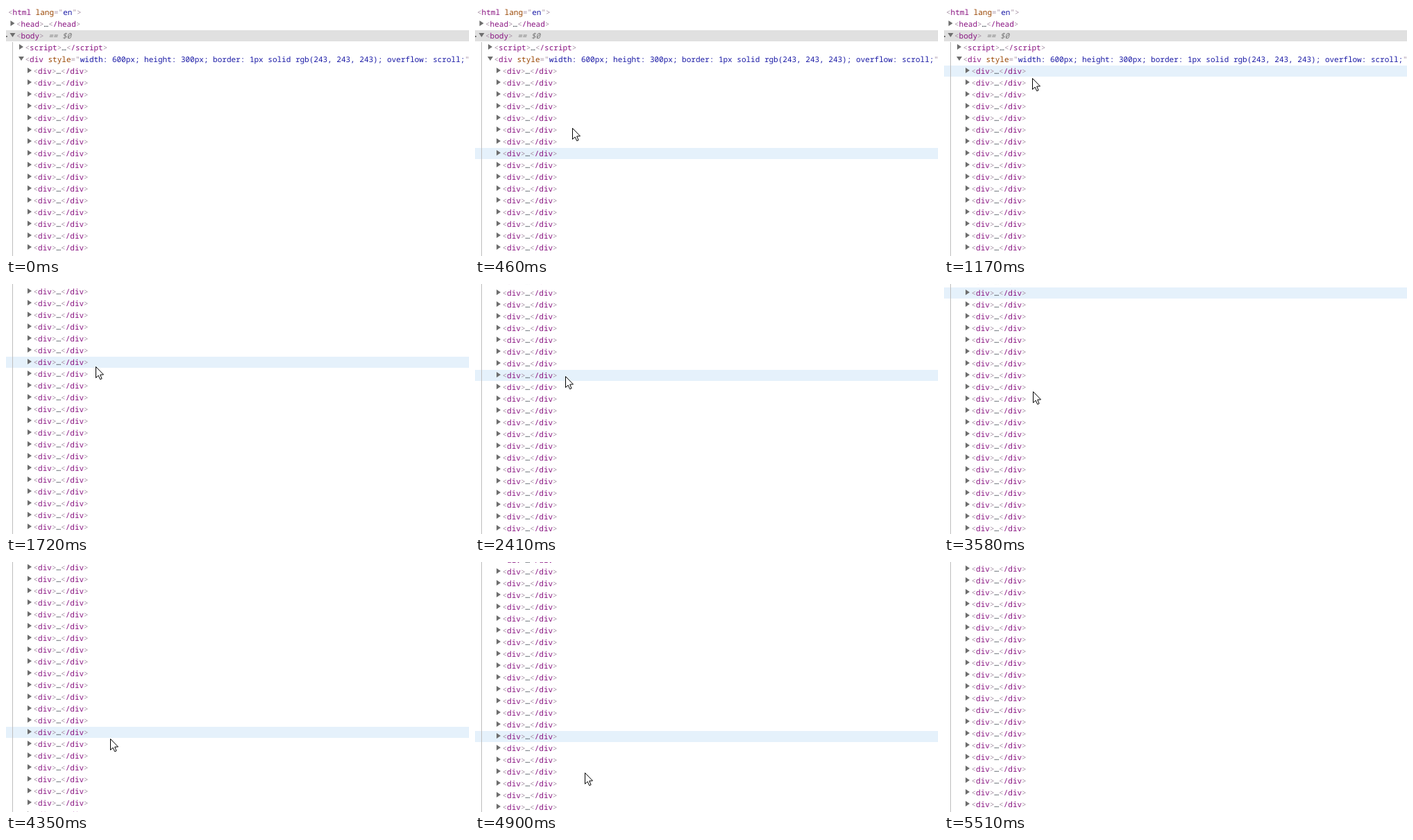
Recreate the animation shown at these times as an HTML page with a canvas. Size 667x361 px, loop 6.6 s.

```html
<!DOCTYPE html>
<html lang="en">
<head>
<meta charset="utf-8">
<title>Element tree scrolling</title>
<style>
  html, body { margin: 0; width: 100%; height: 100%; overflow: hidden; background: #fff; }
  canvas { display: block; }
</style>
</head>
<body>
<canvas id="stage" width="667" height="361"></canvas>
<script>
const WIDTH = 667, HEIGHT = 361, LOOP = 6600;
const TICK = 77.6;             // the screen refreshes in even steps
const FIRST_TICK = 1, LAST_TICK = 70;   // pointer is on stage between these
const ROW = 17, FIRST_CHILD = 94;
const PUNCT = '#a894a6', TAG = '#881280', ATTR = '#994500', VALUE = '#1a1aa6', DARK = '#303942';

const ctx = document.getElementById('stage').getContext('2d');

// Markup as [colour, text] runs
const attr = (name, value) => [[ATTR, ' ' + name], [PUNCT, '="'], [VALUE, value], [PUNCT, '"']];
const open = (name, attrs = []) => [[PUNCT, '<'], [TAG, name], ...attrs, [PUNCT, '>']];
const folded = name => [...open(name), [DARK, '…'], ...open('/' + name)];

const style = 'width: 600px; height: 300px; border: 1px solid rgb(243, 243, 243); overflow: scroll;';
const header = [
  { x: 3, runs: open('html', attr('lang', 'en')) },
  { x: 15, arrow: 'right', runs: folded('head') },
  { x: 15, arrow: 'down', runs: open('body'), selected: true },
  { x: 27.5, arrow: 'right', runs: folded('script') },
  { x: 27.5, arrow: 'down', runs: open('div', attr('style', style)) }
];
const child = { x: 39.5, arrow: 'right', runs: folded('div') };

// Wheel scrolling: start, end, from, to
const scrolls = [
  [1190, 1560, 0, 100],
  [1860, 2230, 100, 200],
  [2440, 2700, 200, 300],
  [2890, 3255, 300, 400],
  [3410, 3763, 400, 600],
  [3770, 4260, 600, 800],
  [4780, 5200, 800, 900]
];

// Pointer: time, x, y
const path = [
  [70, 165, 356], [390, 140, 175], [690, 128, 103.5], [770, 127, 102],
  [1090, 127, 102], [1164, 127, 104], [1780, 129, 121], [2405, 130, 133],
  [2710, 129, 138], [2790, 129, 138], [2870, 129, 139], [3260, 128, 155],
  [3570, 128, 155], [4345, 150, 255], [5432, 166, 352]
];

function scrollAt(t) {
  let top = 0;
  for (const [start, end, from, to] of scrolls) {
    if (t < start) break;
    const left = 1 - Math.min(1, (t - start) / (end - start));
    top = from + (to - from) * (1 - left * left);
  }
  return Math.round(top);
}

function pointerAt(t) {
  const next = path.findIndex(p => p[0] >= t);
  if (next <= 0) return path[next < 0 ? path.length - 1 : 0].slice(1);
  const a = path[next - 1], b = path[next];
  const u = (t - a[0]) / (b[0] - a[0]);
  return [a[1] + (b[1] - a[1]) * u, a[2] + (b[2] - a[2]) * u];
}

// Hover lags one refresh behind and sticks to its row while the list scrolls
function hoveredChild(t) {
  const seen = t - TICK;
  const active = scrolls.find(([start, end]) => seen >= start && seen < end);
  const when = active ? active[0] : seen;
  return Math.floor((pointerAt(when)[1] + scrollAt(when) - FIRST_CHILD + 8) / ROW);
}

function polygon(points, fill) {
  ctx.beginPath();
  points.forEach(([x, y]) => ctx.lineTo(x, y));
  ctx.closePath();
  ctx.fillStyle = fill;
  ctx.fill();
}

function band(y, colour) {
  ctx.fillStyle = colour;
  ctx.fillRect(0, y - 8, WIDTH, 16);
}

function drawRuns(runs, x, y) {
  for (const [colour, text] of runs) {
    ctx.fillStyle = colour;
    ctx.fillText(text, x, y + 4);
    x += ctx.measureText(text).width;
  }
  return x;
}

function drawRow(row, y) {
  if (row.selected) {
    band(y, '#e0e0e0');
    ctx.fillStyle = '#777';
    ctx.fillRect(0, y, 2, 2);
  }
  const left = row.x - 8.5;
  if (row.arrow === 'right') polygon([[left, y - 5], [left + 6, y - 1], [left, y + 3]], '#6e6e6e');
  if (row.arrow === 'down') polygon([[left - 1, y - 4], [left + 7, y - 4], [left + 3, y + 2]], '#6e6e6e');
  const end = drawRuns(row.runs, row.x, y);
  if (row.selected) {
    ctx.font = 'italic ' + FONT;
    drawRuns([['#777', ' == $0']], end, y);
    ctx.font = FONT;
  }
}

function drawPointer([x, y]) {
  ctx.save();
  ctx.translate(Math.round(x) + 0.5, Math.round(y) + 0.5);
  polygon([[0, 0], [0, 16], [3.6, 12.6], [6.2, 18.2], [8.6, 17.2], [6.2, 11.6], [11, 11.4]], '#fff');
  ctx.strokeStyle = '#000';
  ctx.lineWidth = 1;
  ctx.stroke();
  ctx.restore();
}

const FONT = '11px "Noto Sans Mono", "DejaVu Sans Mono", monospace';

function draw(time) {
  const tick = Math.floor((time % LOOP) / TICK);
  const t = tick * TICK;
  const top = scrollAt(t);
  const pointerShown = tick >= FIRST_TICK && tick <= LAST_TICK;

  ctx.fillStyle = '#fff';
  ctx.fillRect(0, 0, WIDTH, HEIGHT);
  ctx.font = FONT;
  ctx.textRendering = 'geometricPrecision';

  if (pointerShown) band(FIRST_CHILD + hoveredChild(t) * ROW - top, '#e5f1fb');

  const guideTop = Math.max(0, 52 - top);
  ctx.fillStyle = '#bdbdbd';
  ctx.fillRect(9, guideTop, 1, HEIGHT - guideTop);

  header.forEach((row, i) => drawRow(row, 9 + i * ROW - top));
  const first = Math.max(0, Math.floor((top - FIRST_CHILD) / ROW));
  for (let k = first; FIRST_CHILD + k * ROW - top < HEIGHT + ROW; k++) {
    drawRow(child, FIRST_CHILD + k * ROW - top);
  }

  if (pointerShown) drawPointer(pointerAt(t));
}

const began = performance.now();
function loop() {
  draw(performance.now() - began);
  requestAnimationFrame(loop);
}
loop();
</script>
</body>
</html>
```
